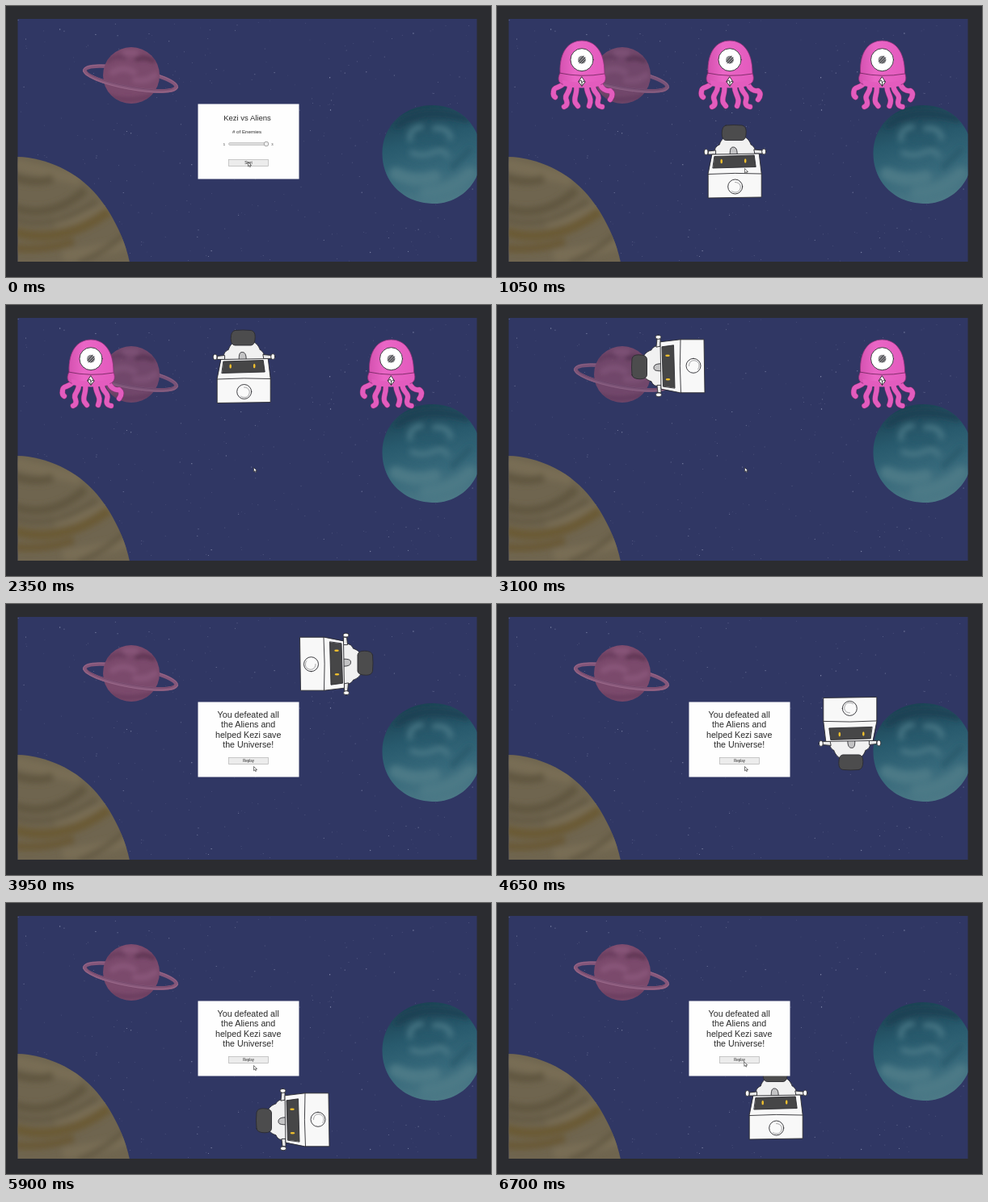
Write an HTML page that moves like this. It is 600 px wide and 336 px high and loops after 6.75 s.

```html
<!DOCTYPE html>
<html lang="en">
<head>
<meta charset="utf-8">
<title>Space game</title>
<style>
  html, body { margin: 0; width: 100%; height: 100%; overflow: hidden; background: #2b2c30; }
  svg { display: block; width: 600px; height: 336px; }
  text { font-family: "Liberation Sans", Arial, sans-serif; text-anchor: middle; fill: #2a2a2a; }
  .ink { stroke: #2c2c30; stroke-width: .9; stroke-linejoin: round; stroke-linecap: round; }
  .line { fill: none; }
</style>
</head>
<body>
<svg viewBox="0 0 600 336">
  <defs>
    <clipPath id="view"><rect x="14.5" y="16" width="568" height="301"/></clipPath>
    <clipPath id="oliveClip"><use href="#oliveShape"/></clipPath>
    <clipPath id="tealClip"><use href="#tealShape"/></clipPath>
    <clipPath id="pinkClip"><circle cx="155" cy="86" r="35"/></clipPath>
    <filter id="soft" x="-30%" y="-30%" width="160%" height="160%"><feGaussianBlur stdDeviation="2.4"/></filter>
    <filter id="softer" x="-30%" y="-30%" width="160%" height="160%"><feGaussianBlur stdDeviation="3.6"/></filter>
    <linearGradient id="tealFill" x1=".35" y1="0" x2=".6" y2="1">
      <stop offset="0" stop-color="#1c4152"/><stop offset=".35" stop-color="#285a6d"/>
      <stop offset=".65" stop-color="#36687a"/><stop offset="1" stop-color="#4d7a87"/>
    </linearGradient>
    <linearGradient id="alienFill" x1="0" y1="0" x2="1" y2="0">
      <stop offset="0" stop-color="#d350ae"/><stop offset=".35" stop-color="#ea66c6"/>
      <stop offset="1" stop-color="#e35abd"/>
    </linearGradient>

    <path id="oliveShape" d="M14 187C50 188 87 205 112 234C132 258 147 289 153 318H14Z"/>
    <path id="tealShape" d="M526 123C562 122 588 150 588 184C588 220 561 246 527 245C491 244 465 217 465.500 182C466 149 491 124 526 123Z"/>
    <path id="legs" fill="none" stroke-linecap="round" stroke-linejoin="round"
      d="M-22 9C-27 17-35 13-35 20Q-36 25-33 27M-15 12C-14 22-23 24-19 31Q-17 37-22 39M-7 13C-5 22-11 28-8 34L-5 38M6 13C5 23 14 27 9 38M14 12C13 22 23 22 20 31Q18 38 25 39M22 9C24 17 30 20 35 19Q40 23 35 30"/>

    <g id="alien">
      <use href="#legs" stroke="#8f3278" stroke-width="7"/>
      <use href="#legs" stroke="#e35cbe" stroke-width="6"/>
      <path fill="url(#alienFill)" stroke="#8f3278" stroke-width=".8"
        d="M-27-3C-28-30-16-43 0-43C16-43 28-30 28-3C31 5 29 11 21 12Q0 17-20 12C-29 11-31 5-27-3Z"/>
      <path fill="#e35cbe" d="M-24 6Q0 12 24 6L23 13Q0 18-23 13Z"/>
      <path class="line" stroke="#6b2459" stroke-width=".8" d="M-28-3Q0 3 28-2"/>
      <circle class="ink" cy="-19.300" r="14" fill="#fff"/>
      <circle cy="-19.300" r="4.900" fill="#8b8b8f"/>
      <path class="ink line" stroke-width=".6" d="M-4-17L2-24M-3-15L4-22M0-15L4-19"/>
      <path class="ink" fill="#fff" stroke-width=".5" d="M0 2L4 8L0 13.500L-4 8Z"/>
      <path class="ink line" stroke-width=".4" d="M-4 8L-1 6L0 9L2 7L4 8M0 9V13"/>
    </g>

    <g id="bot" transform="translate(-.8 0)">
      <path class="ink" fill="#f1f1f1" d="M-24-10C-26-16-24-20-19-22C-17-29-12-32-8-33H8C14-32 18-28 20-22C24-20 26-16 25-10Z"/>
      <path class="ink" fill="#e9e9e9" d="M-24-15L-33-14V-10H-24ZM24-16L34-15V-11H25Z"/>
      <ellipse class="ink" cx="-35.500" cy="-13" rx="2.500" ry="3.500" fill="#fff"/>
      <ellipse class="ink" cx="36" cy="-13.500" rx="2.500" ry="3.500" fill="#fff"/>
      <path class="ink" fill="#4c4c4d" d="M-11-46Q-1-47 9-46Q14-45 14-38Q14-28 9-27.500H-11Q-16-28-16-36Q-16-45-11-46Z"/>
      <path class="ink" fill="#c4c4c5" d="M-6-10C-6-17-5-19-2-19S3-17 3-10Z"/>
      <path class="ink" fill="#f8f8f8" d="M-28-10L30-11L33 14L33 43L-33 44V14Z"/>
      <path class="ink line" d="M-33 14.500Q0 12.500 33 14"/>
      <path class="ink" fill="#464647" d="M-25-7.500L24-9L26 5.500L-27 7Z"/>
      <ellipse cx="-16.500" cy="-1.500" rx="1.300" ry="2.800" fill="#f0c02e"/>
      <ellipse cx="13" cy="-2" rx="1.300" ry="2.800" fill="#f0c02e"/>
      <circle class="ink" cx=".5" cy="30" r="9" fill="#fafafa"/>
      <path class="line" stroke="#8c8c8e" stroke-width=".8" d="M0 24.500C7 24.500 9 31 5 35.500C3 37.500-1 37.500-4 35.500"/>
    </g>

    <g id="panel">
      <rect x="237.500" y="121.500" width="125" height="93" fill="#fefefe"/>
      <rect x="275.500" y="190.500" width="49" height="8" fill="#ececec" stroke="#b4b4b4" stroke-width=".7"/>
    </g>
  </defs>

  <rect width="600" height="336" fill="#2b2c30"/>
  <g clip-path="url(#view)">
    <rect x="14" y="16" width="569" height="301" fill="#303764"/>
    <g id="stars"></g>

    <g id="pinkPlanet">
      <g fill="none" transform="rotate(10.5 154 90)">
        <ellipse cx="154" cy="90" rx="57.500" ry="11.500" stroke="#84567a" stroke-width="4.500"/>
        <ellipse cx="154" cy="90" rx="59.500" ry="13.200" stroke="#99698a" stroke-width=".8"/>
      </g>
      <circle cx="155" cy="86" r="35" fill="#7b4a6c"/>
      <g clip-path="url(#pinkClip)">
        <g filter="url(#soft)" fill="none" stroke-linecap="round">
          <path stroke="#6a3e5e" stroke-width="6" d="M126 68Q136 60 146 64M126 112Q150 120 180 112"/>
          <path stroke="#875478" stroke-width="8" d="M132 82Q146 74 158 82M160 92Q175 94 184 86M148 58H160"/>
          <path stroke="#5e3453" stroke-width="6" d="M162 66Q172 62 182 68"/>
        </g>
      </g>
      <g fill="none" transform="rotate(10.5 154 90)">
        <path stroke="#87587a" stroke-width="4.500" d="M96.500 90A57.500 11.500 0 0 0 211.500 90"/>
        <path stroke="#9c6c8c" stroke-width=".8" d="M94.500 90A59.500 13.200 0 0 0 213.500 90"/>
        <path stroke="#6c4265" stroke-width=".7" d="M99 90A55 10 0 0 0 209 90"/>
      </g>
    </g>

    <use href="#tealShape" fill="url(#tealFill)"/>
    <g clip-path="url(#tealClip)">
      <g filter="url(#softer)" fill="none" stroke-linecap="round">
        <path stroke="#1b4152" stroke-width="8" d="M484 148Q514 124 570 140"/>
        <path stroke="#4a7886" stroke-width="6" d="M500 166Q498 152 514 150M530 152Q548 150 550 164M502 182Q514 188 528 182T546 186"/>
        <path stroke="#4b7986" stroke-width="16" d="M482 208Q506 220 530 212M520 232Q550 230 574 208"/>
        <path stroke="#28596b" stroke-width="6" d="M512 168Q526 162 540 172M552 200L574 178"/>
      </g>
    </g>

    <use href="#oliveShape" fill="#6f654f"/>
    <g clip-path="url(#oliveClip)">
      <g filter="url(#softer)" fill="none">
        <path stroke="#786d54" stroke-width="14" d="M10 196Q54 206 92 216M60 268Q104 262 128 250M70 310Q120 304 156 292"/>
        <path stroke="#60563f" stroke-width="10" d="M10 212Q34 222 58 214M10 250Q56 266 98 228"/>
        <path stroke="#6b5a34" stroke-width="12" d="M10 280Q68 298 128 254"/>
        <path stroke="#695836" stroke-width="9" d="M10 300Q50 304 84 292"/>
        <path stroke="#625842" stroke-width="6" d="M10 264Q56 280 112 242M90 318Q124 304 148 282"/>
      </g>
    </g>

    <g id="aliens"></g>
    <g id="hero"><use href="#bot"/></g>

    <g id="startPanel">
      <use href="#panel"/>
      <text x="298.500" y="142" font-size="9.500">Kezi vs Aliens</text>
      <text x="298" y="158" font-size="6.200"># of Enemies</text>
      <text x="270" y="172.500" font-size="4.200">1</text>
      <text x="329.500" y="172.500" font-size="4.200">3</text>
      <rect x="275.500" y="169.500" width="49" height="3" rx="1.500" fill="#dedede" stroke="#b0b0b0" stroke-width=".6"/>
      <circle cx="322" cy="171" r="2.800" fill="#f0f0f0" stroke="#858585" stroke-width=".7"/>
      <text x="300" y="196.200" font-size="4.500">Start</text>
    </g>
    <g id="endPanel">
      <use href="#panel"/>
      <g id="endText" font-size="10.700"></g>
      <text x="300" y="196.200" font-size="4.500">Replay</text>
    </g>
    <path id="cursor" fill="#fff" stroke="#222" stroke-width=".6" d="M0 0V5.400L1.300 4.300L2.200 6.200L3 5.800L2.200 4H4Z"/>
  </g>
</svg>
<script>
const LOOP = 6750, STEP = 50;
const GAME_START = 400, GAME_END = 3800;
const $ = id => document.getElementById(id);

function add(parent, tag, attrs, content = '') {
  const el = document.createElementNS('http://www.w3.org/2000/svg', tag);
  for (const key in attrs) el.setAttribute(key, attrs[key]);
  el.textContent = content;
  return parent.appendChild(el);
}

function randomFrom(seed) {
  return () => (seed = (seed * 16807) % 2147483647) / 2147483647;
}

const rand = randomFrom(4217);
for (let i = 0; i < 380; i++) {
  add($('stars'), 'circle', {
    cx: (15 + rand() * 567).toFixed(1),
    cy: (17 + rand() * 299).toFixed(1),
    r: (.3 + rand() ** 3 * .4).toFixed(2),
    fill: '#a9aecb',
    opacity: (.3 + rand() * .45).toFixed(2)
  });
}

['You defeated all', 'the Aliens and', 'helped Kezi save', 'the Universe!'].forEach((line, i) =>
  add($('endText'), 'text', { x: 299.7, y: 140.7 + i * 12.4 }, line));

// x position and the time each alien is beaten
const aliens = [[105, 3000], [288, 1700], [476.5, GAME_END]].map(([x, gone]) => ({
  gone,
  el: add($('aliens'), 'use', { href: '#alien', transform: `translate(${x} 86)` })
}));

// time, x, y, heading in degrees; the heading switches at once
const heroPath = [
  [400, 295, 194, 0], [1500, 295, 194, 0], [1800, 295, 132, 0], [2050, 295, 80, 0],
  [2650, 295, 75, -90], [2700, 295, 75, -90], [3100, 213, 75, -90],
  [3150, 206, 75, 90], [3950, 407.5, 75, 90], [4070, 436, 75, 90],
  [4300, 436, 75, 180], [5100, 436, 268, 180], [5500, 436, 268, -90],
  [5950, 346, 268, -90], [6350, 346, 268, 0], [6500, 346, 249, 0]
];
const cursorPath = [[0, 299.5, 193.5], [400, 299.5, 193.5], [650, 306.5, 201.5],
  [6450, 306.5, 201.5], [6700, 305.8, 197]];

function sample(path, t) {
  let i = 0;
  while (i < path.length - 1 && path[i + 1][0] <= t) i++;
  const a = path[i], b = path[i + 1] || a;
  const p = b === a ? 0 : Math.max(0, (t - a[0]) / (b[0] - a[0]));
  return { x: a[1] + (b[1] - a[1]) * p, y: a[2] + (b[2] - a[2]) * p, turn: a[3] || 0 };
}

function show(el, on) {
  el.style.display = on ? '' : 'none';
}

function draw(now) {
  const t = Math.floor((now % LOOP) / STEP) * STEP;
  const playing = t >= GAME_START && t < GAME_END;
  show($('startPanel'), t < GAME_START);
  show($('endPanel'), t >= GAME_END);
  $('pinkPlanet').setAttribute('opacity', playing ? .88 : 1);
  aliens.forEach(a => show(a.el, playing && t < a.gone));

  show($('hero'), t >= GAME_START);
  const h = sample(heroPath, t);
  $('hero').setAttribute('transform', `translate(${h.x} ${h.y}) rotate(${h.turn})`);
  const c = sample(cursorPath, t);
  $('cursor').setAttribute('transform', `translate(${c.x} ${c.y})`);
}

const began = performance.now();
function tick() {
  draw(performance.now() - began);
  requestAnimationFrame(tick);
}
tick();
</script>
</body>
</html>
```
